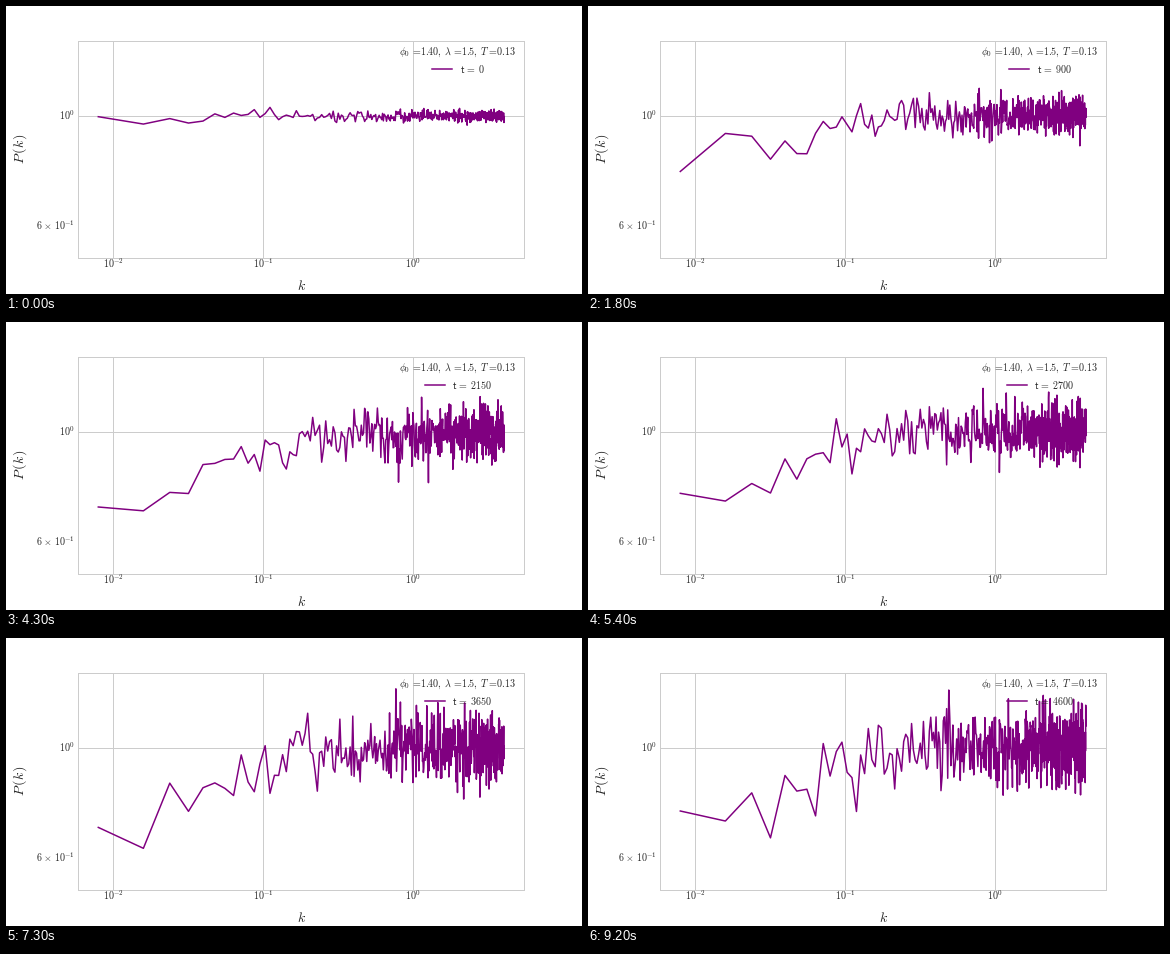
Animation of 576 by 288 pixels, one loop 9300 ms. Source, as a matplotlib script:

```python
import numpy as np
import matplotlib.pyplot as plt
from matplotlib.animation import FuncAnimation
from matplotlib.lines import Line2D

W, H, DPI = 576, 288, 72
FRAMES, STEP = 93, 50
MODES = 512
DECADE = 500.5          # pixels per decade on the vertical axis
PURPLE, INK, PALE = "purple", "0.15", "0.8"

plt.rcParams["mathtext.fontset"] = "cm"


def spectra():
    """Correlated noise that widens with time around a sinking low-k end."""
    rng = np.random.default_rng(14)
    n = np.arange(1, MODES + 1)
    dip = 92 * np.exp(-(n / 9) ** 1.2)
    keep = 0.5
    z = rng.standard_normal(MODES)
    rows = []
    for f in range(FRAMES):
        z = keep * z + np.sqrt(1 - keep ** 2) * rng.standard_normal(MODES)
        spread = 3 + 1.7 * np.sqrt(f)
        sink = dip * (1 - np.exp(-f / 25))
        height = spread * np.clip(z, -3.6, 3.6) - sink
        rows.append(10 ** (np.maximum(height, -131) / DECADE))
    return rows


fig = plt.figure(figsize=(W / DPI, H / DPI), dpi=DPI, facecolor="white")
ax = fig.add_axes([0.125, 0.125, 0.775, 0.755])
ax.set_xscale("log")
ax.set_yscale("log")

# The data spans the axes with a 5 % margin on either side
k = 0.00794 * np.arange(1, MODES + 1)
margin = MODES ** 0.05
ax.set_xlim(k[0] / margin, k[-1] * margin)
ax.set_ylim(0.52, 1.414)

ax.set_axisbelow(True)
ax.grid(True, which="major", color=PALE, linewidth=1)
ax.tick_params(which="both", length=0, labelbottom=False, labelleft=False)
for spine in ax.spines.values():
    spine.set(color=PALE, linewidth=1)


def label(x, y, text, size=10, **kw):
    kw = {"ha": "center", "va": "baseline", **kw}
    return fig.text(x / W, 1 - y / H, text, fontsize=size, color=INK, **kw)


def power(p):
    return r"\mathrm{10}^{\mathrm{%s}}" % p


def pair(name, value):
    return name + r"\hspace{0.15}=\hspace{-0.18}\mathsf{%s}" % value


for x, p in ((107.3, "-2"), (257.1, "-1"), (406.9, "0")):
    label(x, 261.5, f"${power(p)}$")
label(69, 113.5, f"${power('0')}$", ha="right")
label(69, 224.5, r"$\mathrm{6}\hspace{0.1}\times\hspace{0.1}%s$" % power("-1"),
      ha="right")
label(295.5, 284.5, "$k$", 14)
label(14.5, 142.5, r"$P\hspace{0.16}(k\hspace{0.08})$", 14,
      rotation=90, va="center")

title = r",\hspace{0.2}".join([
    pair(r"\phi_{\mathrm{0}}", "1.40"),
    pair(r"\lambda", "1.5"),
    pair("T", "0.13"),
])
label(452, 49, f"${title}$")

curve, = ax.plot([], [], color=PURPLE, linewidth=1.5)
handle = fig.add_artist(Line2D([], [], color=PURPLE, linewidth=1.5))
clock = label(454, 67, "", ha="left")
rows = spectra()


def draw(f):
    curve.set_data(k, rows[f])
    t = str(f * STEP)
    left = 451.8 - (46 + 5 * len(t)) / 2     # keeps the entry centred
    handle.set_data([left / W, (left + 20) / W], [1 - 63.2 / H] * 2)
    clock.set_x((left + 27.3) / W)
    clock.set_text(r"$\mathsf{t}\hspace{0.18}=\hspace{0.18}\mathsf{%s}$" % t)
    return curve, handle, clock


anim = FuncAnimation(fig, draw, frames=FRAMES, interval=100,
                     repeat=True, repeat_delay=0)
plt.show()
```
